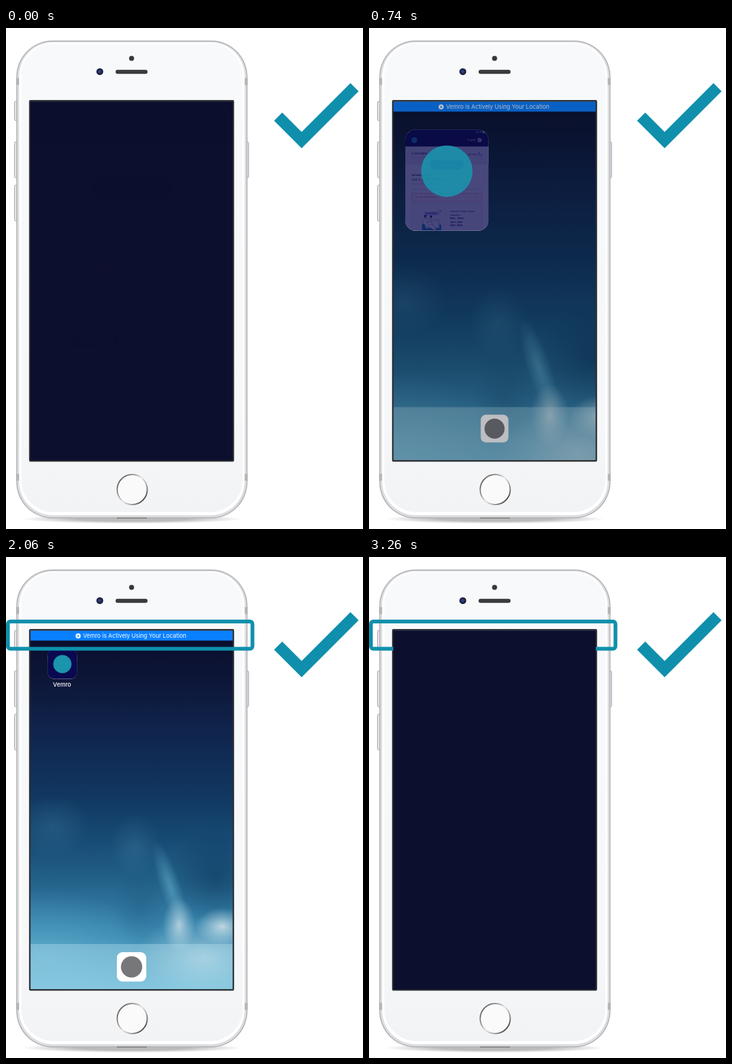
Recreate the animation shown at these times as an HTML page. Size 570 px wide and 800 px high, loop 3280 ms.

```html
<!DOCTYPE html>
<html lang="en">
<head>
<meta charset="utf-8">
<title>Keep the app running</title>
<style>
html, body { margin: 0; width: 100%; height: 100%; overflow: hidden; background: #fff; }
svg { display: block; }
text { font-family: "Noto Sans", sans-serif; fill: #0c0f2d; }
.b { font-weight: 700; }
.mid { text-anchor: middle; }
.sys text { font-family: Inter, sans-serif; fill: #fff; }
.s7 { font-size: 6.95px; }
.s8 { font-size: 7.8px; }
.s9 { font-size: 9.3px; }
.s10 { font-size: 10px; }
.pale { fill: #aeaeb6; }
.line { fill: none; stroke: #0c0f2d; stroke-width: .8; }
</style>
</head>
<body>
<svg width="570" height="800" viewBox="0 0 570 800">
<defs>
  <linearGradient id="sky" x2="0" y2="1">
    <stop offset="0" stop-color="#0a0c2a"/>
    <stop offset=".14" stop-color="#0d1638"/>
    <stop offset=".3" stop-color="#10264f"/>
    <stop offset=".45" stop-color="#10365f"/>
    <stop offset=".58" stop-color="#164a74"/>
    <stop offset=".7" stop-color="#23628a"/>
    <stop offset=".82" stop-color="#3884ac"/>
    <stop offset="1" stop-color="#62b4d4"/>
  </linearGradient>
  <radialGradient id="glow">
    <stop offset="0" stop-color="#74c2de" stop-opacity=".65"/>
    <stop offset="1" stop-color="#74c2de" stop-opacity="0"/>
  </radialGradient>
  <radialGradient id="shade">
    <stop offset="0" stop-color="#0c3358" stop-opacity=".55"/>
    <stop offset="1" stop-color="#0c3358" stop-opacity="0"/>
  </radialGradient>
  <radialGradient id="foam">
    <stop offset="0" stop-color="#eef4f4" stop-opacity=".85"/>
    <stop offset="1" stop-color="#c8e6ee" stop-opacity="0"/>
  </radialGradient>
  <radialGradient id="shadow">
    <stop offset=".5" stop-color="#777" stop-opacity=".5"/>
    <stop offset="1" stop-color="#777" stop-opacity="0"/>
  </radialGradient>
  <linearGradient id="face" x2="0" y2="1">
    <stop offset="0" stop-color="#f8f9fb"/>
    <stop offset=".8" stop-color="#f6f7f9"/>
    <stop offset="1" stop-color="#f2f3f5"/>
  </linearGradient>
  <linearGradient id="ring" x2="1" y2=".8">
    <stop offset="0" stop-color="#444"/>
    <stop offset=".35" stop-color="#999"/>
    <stop offset=".55" stop-color="#e4e4e6"/>
    <stop offset=".75" stop-color="#aaa"/>
    <stop offset="1" stop-color="#333"/>
  </linearGradient>
  <clipPath id="screen"><rect x="39" y="117.5" width="323" height="573"/></clipPath>
  <clipPath id="window"><rect id="frame"/></clipPath>
  <g id="status">
    <g fill="none" stroke="#fff" stroke-width="1.5">
      <path d="M45.3 124.6a6.8 6.8 0 0 1 10.4 0M47.4 126.9a4.2 4.2 0 0 1 6.2 0"/>
      <circle cx="319.3" cy="126" r="3.4" stroke-width=".9"/>
    </g>
    <path d="M48.8 128.2h3.4l-1.7 2zM317.6 125.6h3.4v2.4h-3.4zM335 122l-7 3.7 3.3.5.5 3.4z" fill="#fff"/>
    <rect x="339" y="121.6" width="16" height="8.6" rx="2.4" fill="#4ccf63" stroke="#cfe" stroke-width=".7"/>
    <path d="M356.2 124.3q1.6 1.6 0 3.2z" fill="#fff"/>
    <path d="M348.6 121.5l-4 5h2.6l-1 4 4-5h-2.7z" fill="#fff" stroke="#14502a" stroke-width=".4"/>
  </g>
  <g id="locate">
    <circle r="4.1" fill="#fff"/>
    <path d="M0-2.4L1.8 2 0 1-1.8 2z" fill="#0a80ff"/>
  </g>
</defs>

<!-- Phone body -->
<ellipse cx="201" cy="784" rx="176" ry="7.5" fill="url(#shadow)"/>
<g fill="#e6e7e9" stroke="#a2a4a8">
  <rect x="13.5" y="117.5" width="5" height="30" rx="1.5"/>
  <rect x="13.5" y="182" width="5" height="57" rx="1.5"/>
  <rect x="13.5" y="251" width="5" height="57" rx="1.5"/>
  <rect x="382.5" y="182" width="5" height="57" rx="1.5"/>
</g>
<rect x="16.5" y="20" width="369" height="763" rx="58" fill="#adafb2"/>
<rect x="18" y="21.5" width="366" height="760" rx="56.5" fill="#dcdde0"/>
<path d="M16 80h6v11h-6zM380 80h6v11h-6zM16 712h6v11h-6zM380 712h6v11h-6z" fill="#b5b7b9"/>
<rect x="21" y="23" width="360" height="755" rx="54" fill="#fff"/>
<rect x="24.5" y="25" width="353" height="748" rx="51" fill="url(#face)"/>
<path d="M177 782.5h48" stroke="#777" stroke-width="1.5"/>
<circle cx="200.5" cy="48.5" r="4" fill="#38383c"/>
<circle cx="149.8" cy="69.7" r="5.5" fill="#20233e"/>
<circle cx="149.5" cy="69.5" r="2.5" fill="#2c3f86"/>
<rect x="175" y="66.7" width="51" height="6.6" rx="3.3" fill="#3b3b3d"/>
<circle cx="201.5" cy="737" r="24" fill="#fafafb" stroke="url(#ring)" stroke-width="2"/>
<path d="M428 148l13-13 31 31 78-78 13 13-91 91z" fill="#0f8fab"/>

<g clip-path="url(#screen)">
  <!-- Home screen -->
  <g id="wall">
    <rect x="39" y="117" width="324" height="574" fill="url(#sky)"/>
    <ellipse cx="60" cy="640" rx="170" ry="110" fill="url(#glow)" opacity=".6"/>
    <ellipse cx="75" cy="430" rx="60" ry="50" fill="url(#glow)" opacity=".22"/>
    <ellipse cx="205" cy="460" rx="40" ry="50" fill="url(#glow)" opacity=".22"/>
    <ellipse cx="335" cy="510" rx="75" ry="75" fill="url(#shade)" opacity=".9"/>
    <ellipse cx="215" cy="560" rx="45" ry="65" fill="url(#shade)" opacity=".3"/>
    <ellipse cx="262" cy="525" rx="17" ry="75" fill="url(#glow)" opacity=".7" transform="rotate(-18 262 525)"/>
    <ellipse cx="276" cy="588" rx="26" ry="44" fill="url(#foam)" opacity=".75"/>
    <ellipse cx="345" cy="590" rx="42" ry="30" fill="url(#foam)" opacity=".85"/>
    <ellipse cx="315" cy="640" rx="110" ry="65" fill="url(#foam)" opacity=".55"/>
    <g id="specks" fill="#7a93b8"></g>
  </g>
  <g id="home">
    <rect x="-60" y="618" width="520" height="300" fill="#bfe6f2" opacity=".36"/>
    <g id="dots" fill="#fff"></g>
    <rect x="177" y="631" width="47" height="47" rx="9" fill="#fff"/>
    <circle cx="200.5" cy="654.5" r="17" fill="#777779"/>
  </g>
  <rect id="dim" x="39" y="117" width="324" height="574" fill="#020818"/>

  <!-- App window, shrinking to its icon -->
  <g clip-path="url(#window)">
    <g id="page">
      <rect x="39" y="117" width="324" height="574" fill="#f8f8fa"/>
      <rect x="39" y="183" width="324" height="71" fill="#e7e7eb"/>
      <rect x="39" y="117" width="324" height="66" fill="#0c0f2d"/>
      <use href="#status"/>
      <circle cx="74" cy="158.5" r="11.5" fill="#1b94ae"/>
      <text x="280" y="160" class="s10" style="fill:#fff">English</text>
      <circle cx="328.5" cy="158" r="8" fill="#fff"/>
      <path d="M322 154l4 2 3 3-2 5-3-3zM329 151l5 3-2 3-3-1zM331 159l4 1-3 4z" fill="#0c0f2d"/>
      <text x="63" y="214.5" font-size="14">2 months left</text>
      <text x="63" y="228" font-size="6.87" class="pale">End date Dec 10, 2020 12:00 PM</text>
      <text x="280" y="216" font-size="9.4" style="fill:#2424b8">Call Help</text>
      <path d="M324.5 206.5h3.5l1.5 4-2 1.5q1.5 3 4 4.5l1.8-2 3.7 1.7v3q-1 1.5-3 1-8-2-10.2-10.5-.3-2 .7-3.2z" fill="none" stroke="#2424b8" stroke-width="1.2"/>
      <rect x="135" y="236" width="131" height="36" rx="18" fill="#2424d0"/>
      <text x="200.5" y="258" class="s10 mid" style="fill:#fff">Submit Report</text>
      <text x="63" y="298" font-size="7" class="b">Last Submitted Report</text>
      <text x="63" y="317" font-size="13.7">Oct 7, 2020 3:38 PM</text>
      <text x="63" y="330.5" class="s7 pale">Temperature: 37°C, Symptoms: Nil</text>
      <path d="M63 348.8h275" stroke="#b4b4cc"/>
      <rect x="63.5" y="365.5" width="274" height="31.5" rx="3" fill="#f9ecef" stroke="#e0484f"/>
      <text x="79" y="384" class="s9" style="fill:#d83c46">Do not close Vemro</text>
      <path d="M310 380l3.5 3.5 3.5-3.5" fill="none" stroke="#d83c46" stroke-width="1.3"/>
      <rect x="63.5" y="405.5" width="274" height="181" rx="3" fill="#f1f1f5" stroke="#b7b7cc"/>

      <!-- Reader on a couch -->
      <rect x="110" y="437" width="61" height="15" rx="7.5" fill="#bcc4f2"/>
      <text x="140.5" y="446.8" font-size="6.2" class="mid">Submit Report</text>
      <path class="line" d="M170 435q4 1 4 5M171 432q6 2 6.5 8M172 429.5q8 2 8.5 10"/>
      <path d="M104 487q6-4 11 0l3 14h54v-13q5-3 7 2v20h-75z" fill="#1b94ae"/>
      <path d="M132 470h37v31h-37z" class="line" style="fill:#f5f5f8"/>
      <path class="line" style="fill:#fff" d="M113 462q-7 8-6 21l14 10 18 8 16 10 6-2-14-21-10-13 2-13-5-1-4 11q-7-11-17-10z"/>
      <path class="line" d="M116 466l12 20 22 5M122 478l18-2M154 510l12 1"/>
      <circle cx="118" cy="457" r="4.5" class="line" style="fill:#fff"/>
      <path d="M112 457q0-7 7-6 5 1 4 4-6-1-8 4zM135 453l6-2 2 9-6 2z" fill="#0c0f2d"/>
      <path class="line" d="M87 513h227" stroke-opacity=".6"/>

      <text x="214" y="439.5" class="s9">Submit 3 daily reports</text>
      <text x="214" y="453" class="s9">between:</text>
      <text x="214" y="466.5" class="s9 b">8am - 10am</text>
      <text x="214" y="480" class="s9 b">1pm - 3pm</text>
      <text x="214" y="493.5" class="s9 b">6pm - 8pm</text>
      <text x="87" y="537" class="s8">Failure to do so will result in enforcers' calls and house</text>
      <text x="87" y="548.5" class="s8">visitations.</text>
      <text x="87" y="560" class="s8" text-decoration="underline">Learn More</text>
      <circle cx="66.5" cy="608" r="3" fill="none" stroke="#777" stroke-width=".7"/>
      <path d="M66.5 606v2.5h1.5" fill="none" stroke="#777" stroke-width=".6"/>
      <text x="72" y="611" class="s7" style="fill:#74747c">Please do not close the app. Leave it running in the background at all times for</text>
      <text x="63" y="622" class="s7 pale">location reporting.</text>
      <path d="M39 632h324" stroke="#3434bc" stroke-width="1.5"/>
      <path d="M93 643.5l8 7.5h-2v8.5h-12v-8.5h-2z" fill="#2424b8"/>
      <circle cx="93" cy="653" r="2.2" fill="#f8f8fa"/>
      <g fill="none" stroke="#808086" stroke-width="1.6">
        <circle cx="200.5" cy="651.5" r="7.2"/>
        <path d="M200.5 647v5h4M301.5 645.5h12v12h-12zM307.5 650.5v4.5M307.5 647.7v1.4"/>
      </g>
      <text x="93" y="677.5" class="s7 b mid" style="fill:#2424a4">Home</text>
      <text x="200.5" y="677.5" class="s7 mid" style="fill:#808086">History</text>
      <text x="307.5" y="677.5" class="s7 mid" style="fill:#808086">FAQ</text>
    </g>
    <rect id="tile" width="570" height="800" fill="#090950"/>
    <circle id="mark" fill="#1b94ae"/>
  </g>

  <g class="sys">
    <text id="label" x="89.5" y="206.5" font-size="9.3" class="mid" font-weight="500">Vemro</text>
    <g id="bar">
      <rect x="39" y="117" width="324" height="16.5" fill="#0a80ff"/>
      <g id="notice">
        <use href="#locate" x="115.2" y="126"/>
        <text x="123" y="129.3" font-size="9.2">Vemro is Actively Using Your Location</text>
      </g>
      <g id="clock">
        <use href="#status"/>
        <use href="#locate" x="179.5" y="126"/>
        <text x="187" y="129.3" font-size="9.5" font-weight="600">9:41 am</text>
      </g>
    </g>
  </g>
</g>
<rect x="38" y="116.2" width="325" height="575" rx="1" fill="none" stroke="#2e2f33" stroke-width="2.4"/>
<rect id="box" x="3" y="103" width="390.5" height="43.5" rx="4" fill="none" stroke="#0f90ac" stroke-width="6"/>
<g clip-path="url(#screen)"><rect id="dark" x="39" y="117" width="324" height="574" fill="#0c0f2d"/></g>
<script>
const LOOP = 3280, CX = 200.5, CY = 403;
const $ = id => document.getElementById(id);
const ramp = (t, from, to) => Math.min(1, Math.max(0, (t - from) / (to - from)));
const mix = (a, b, p) => a + (b - a) * p;
const set = (id, attrs) => { for (const k in attrs) $(id).setAttribute(k, attrs[k]); };
const fade = (id, opacity) => set(id, { opacity });
const zoom = (id, s) => set(id, { transform: `translate(${CX} ${CY}) scale(${s}) translate(${-CX} ${-CY})` });

let seed = 11;
const rand = () => (seed = seed * 16807 % 2147483647) / 2147483647;
let specks = '';
for (let i = 0; i < 90; i++) {
  const tall = rand() < .2;
  specks += `<ellipse cx="${39 + rand() * 324}" cy="${150 + rand() * 260}" rx="${tall ? 1.2 : 1.5 + rand() * 4}"
    ry="${tall ? 3 + rand() * 6 : 1.6}" opacity="${.03 + rand() * .14}"/>`;
}
$('specks').innerHTML = specks;
$('dots').innerHTML = [0, 1, 2, 3].map(i =>
  `<circle cx="${182 + i * 12.4}" cy="609.5" r="2.7" opacity="${i < 3 ? .5 : 1}"/>`).join('');

function draw(t) {
  const left = 1 - ramp(t, 550, 980);
  const p = 1 - left * left;

  // The window narrows, and loses height a little faster
  const w = mix(324, 47, p), h = mix(47, 574, Math.pow(1 - p, 1.3));
  const x = mix(CX + .5, 90, p) - w / 2, y = mix(404, 171, p) - h / 2;
  set('frame', { x, y, width: w, height: h, rx: 44 * p * (1 - p) + 10 * p });
  set('page', { transform: `translate(${x} ${y}) scale(${w / 324}) translate(-39 -117)` });
  set('mark', { cx: x + w / 2, cy: y + w / 2, r: w * .31 });
  fade('tile', ramp(p, .115, .9));
  fade('mark', ramp(p, .2, .76));
  fade('label', ramp(t, 860, 980));

  zoom('wall', 1 + .54 * (1 - p));
  zoom('home', 1 - .19 * (1 - p));
  fade('dim', .85 * (1 - p));

  const swap = ramp(t, 2100, 2300);
  fade('bar', ramp(t, 580, 660) * Math.min(1, .72 + (t - 740) * .0004));
  fade('notice', 1 - swap);
  fade('clock', swap);
  fade('box', 1 - (1 - ramp(t, 940, 1100)) ** 2);
  fade('dark', 1 - ramp(t, 0, 200) + ramp(t, 3060, 3260));
}

function tick() {
  draw(performance.now() % LOOP);
  requestAnimationFrame(tick);
}
tick();
</script>
</svg>
</body>
</html>
```
